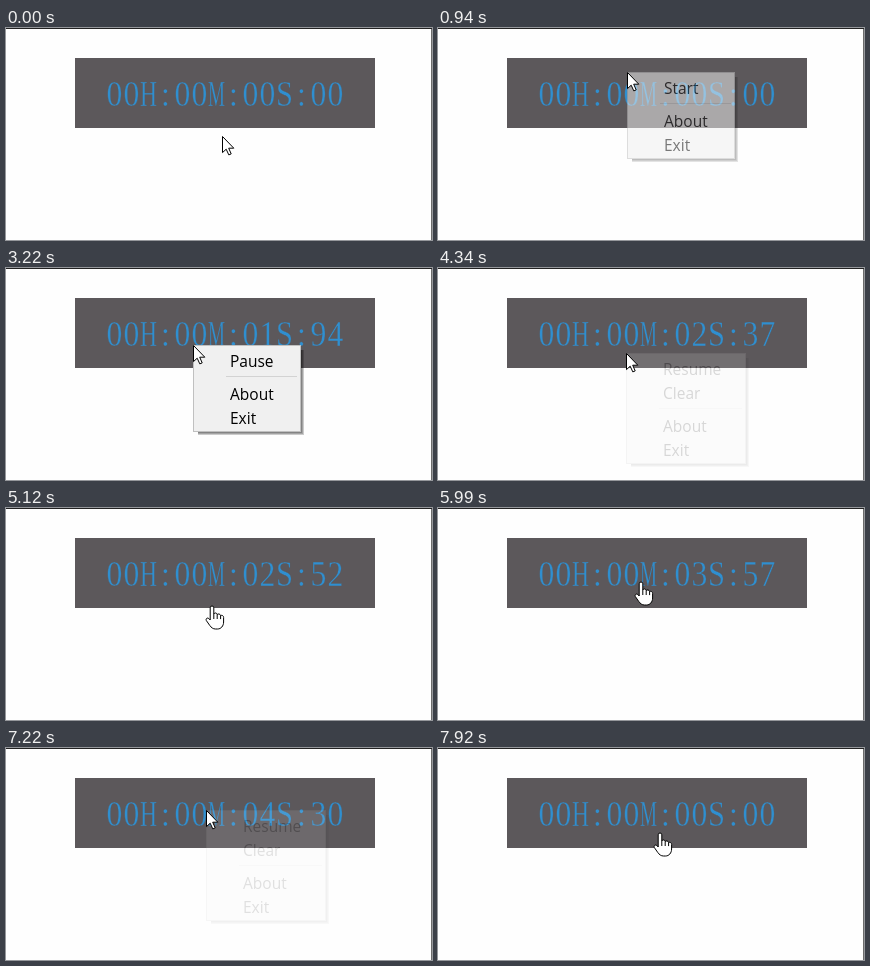
An HTML page that plays this animation: 426 px wide and 212 px high, repeating every 8 s.

```html
<!DOCTYPE html>
<html lang="en">
<head>
<meta charset="utf-8">
<title>Stopwatch</title>
<style>
html, body { margin: 0; width: 100%; height: 100%; overflow: hidden; background: #fefefe; }
svg { display: block; width: 100vw; height: 100vh; }
.clock { font: 36px "Liberation Serif", serif; fill: #2f8fd0; stroke: #5c585b; stroke-width: .35; text-anchor: middle; }
.menu { font: 15.5px "Open Sans", "Noto Sans", sans-serif; }
.pointer { fill: #fff; stroke: #000; stroke-linejoin: round; }
</style>
</head>
<body>
<svg viewBox="0 0 426 212" xmlns="http://www.w3.org/2000/svg">
  <rect width="426" height="212" fill="#fefefe"/>
  <path d="M425.5 0V212" stroke="#6c6c6c"/>
  <path d="M0 .5H426" stroke="#222"/>
  <rect x="69" y="30" width="300" height="70" fill="#5c585b"/>
  <g id="clock" class="clock"></g>
  <g id="menus" class="menu"></g>
  <g id="pointer" class="pointer">
    <circle id="ring" cx=".5" cy=".5" r="10.2" fill="none" stroke-width="1.2"/>
    <path id="arrow" d="M.5 .5V16.6L4.2 13.2 6.8 18.9 9.2 17.9 6.7 12.2H11.8Z"/>
    <g id="hand">
      <path d="M-1.8 14V1.8a1.8 1.8 0 0 1 3.6 0V8C2.5 6.3 5 6.8 5.2 8.5 6 7.4 8.4 8 8.6 9.6 10 8.8 11.6 9.8 11.6 11.4V16C11.6 20 9 23 5.5 23H3.5C1 23 -.8 21.5 -2.2 19.5L-5.7 14.5C-6.6 12.8 -4.6 11.2 -3.2 12.5Z"/>
      <path d="M1.8 8v5M5.2 8.5v4.5M8.6 9.6v3.5" fill="none"/>
    </g>
  </g>
</svg>
<script>
const LOOP = 8000, FADE = 200, PRESS = 150, REST = 240;
const CELL = 17, ROW = 24;
const $ = id => document.getElementById(id);

function add(parent, tag, attrs, text = '') {
  const el = document.createElementNS('http://www.w3.org/2000/svg', tag);
  for (const key in attrs) el.setAttribute(key, attrs[key]);
  el.textContent = text;
  return parent.appendChild(el);
}

// Each visit opens a menu at the pointer and closes it by picking a row.
// count: hundredths on the clock at that moment; then: where the pointer goes next.
const running = ['Pause'], paused = ['Resume', 'Clear'];
const visits = [
  { open: 820, close: 1320, x: 189, y: 44, actions: ['Start'], pick: 0, count: 0, then: [1870, 211, 74] },
  { open: 2990, close: 3640, x: 187, y: 77, actions: running, pick: 0, count: 237 },
  { open: 4270, close: 4840, x: 188, y: 85, actions: paused, pick: 0, count: 237, then: [5120, 208, 95] },
  { open: 6080, close: 6650, x: 203, y: 73, actions: running, pick: 0, count: 430 },
  { open: 7070, close: 7640, x: 200, y: 62, actions: paused, pick: 1, count: 430, then: [7790, 222, 85] }
];
const cleared = visits[visits.length - 1].close;

const countKeys = [[0, 0], ...visits.map(v => [v.close, v.count])];
const path = [[0, 216, 108], [300, 216, 108]];
for (const v of visits) {
  const item = [v.x + 16, v.y + 16 + ROW * v.pick];
  path.push([v.open - 60, v.x, v.y], [v.open + REST, v.x, v.y]);
  path.push([v.close - PRESS, ...item], [v.close, ...item]);
  if (v.then) path.push(v.then);
  buildMenu(v);
}

function buildMenu(v) {
  const n = v.actions.length;
  const w = n > 1 ? 120 : 108;
  const sep = 3 + ROW * n;
  const h = sep + 9 + ROW * 2 + 3;
  v.g = add($('menus'), 'g', { transform: `translate(${v.x} ${v.y})` });
  for (let i = 1; i <= 3; i++)
    add(v.g, 'rect', { x: 5, y: 5, width: w - 5 + i, height: h - 5 + i, 'fill-opacity': .2 });
  add(v.g, 'rect', { x: .5, y: .5, width: w - 1, height: h - 1, fill: '#f0f0f0', stroke: '#c0c0c0' });
  v.hover = add(v.g, 'rect', { x: 3, width: w - 7, height: ROW, fill: '#91c9f7' });
  add(v.g, 'rect', { x: 33, y: sep + 4, width: w - 37, height: 1, fill: '#d3d3d3' });
  v.rows = [...v.actions, 'About', 'Exit'].map((label, i) => {
    const top = 3 + ROW * i + (i < n ? 0 : 9);
    add(v.g, 'text', { x: 37, y: top + 18.5 }, label);
    return top;
  });
}

const cells = Array.from({ length: 14 }, () => add($('clock'), 'text', {}));

// Every glyph is condensed, wide ones until they fit their cell.
function setGlyph(el, ch, i) {
  if (el.textContent === ch) return;
  el.textContent = ch;
  const k = Math.min(.88, CELL / el.getComputedTextLength());
  el.setAttribute('transform', `translate(${100 + CELL * (i + .5)} 77.5) scale(${k} 1)`);
}

function at(keys, t) {
  const n = keys.findIndex(k => k[0] > t);
  if (n < 0) return keys[keys.length - 1].slice(1);
  const a = keys[n - 1], b = keys[n];
  const u = (t - a[0]) / (b[0] - a[0]);
  return a.slice(1).map((v, i) => v + (b[i + 1] - v) * u);
}

// The screen refreshes on a steady beat, which slows after the clock resumes.
function refresh(now) {
  const [start, beat] = now < 4840 ? [-20, 135] : [4840, 140.8];
  return Math.max(0, start + Math.floor((now - start) / beat) * beat);
}

const show = (el, on) => el.setAttribute('display', on ? 'inline' : 'none');
const pad = n => String(Math.floor(n)).padStart(2, '0');

function clockText(c) {
  const s = c / 100;
  return `${pad(s / 3600)}H:${pad(s / 60 % 60)}M:${pad(s % 60)}S:${pad(c % 100)}`;
}

function draw(now) {
  const t = refresh(now);
  const [x, y] = at(path, t).map(Math.round);
  const text = clockText(t < cleared ? Math.floor(at(countKeys, t)[0]) : 0);
  cells.forEach((el, i) => setGlyph(el, text[i], i));

  const current = visits.find(v => t >= v.open && t < v.close);
  for (const v of visits) show(v.g, v === current);
  if (current) {
    const dy = y - current.y;
    const row = current.rows.find(top => x >= current.x + 3 && dy >= top && dy < top + ROW);
    current.g.setAttribute('opacity', Math.min(1, (t - current.open) / FADE));
    show(current.hover, row !== undefined);
    current.hover.setAttribute('y', row || 0);
  }

  const hand = !current && x >= 69 && x < 369 && y >= 30 && y < 100;
  $('pointer').setAttribute('transform', `translate(${x} ${y})`);
  show($('hand'), hand);
  show($('arrow'), !hand);
  show($('ring'), current && t >= current.close - PRESS);
}

const begin = performance.now();
function tick() {
  draw((performance.now() - begin) % LOOP);
  requestAnimationFrame(tick);
}
tick();
</script>
</body>
</html>
```
